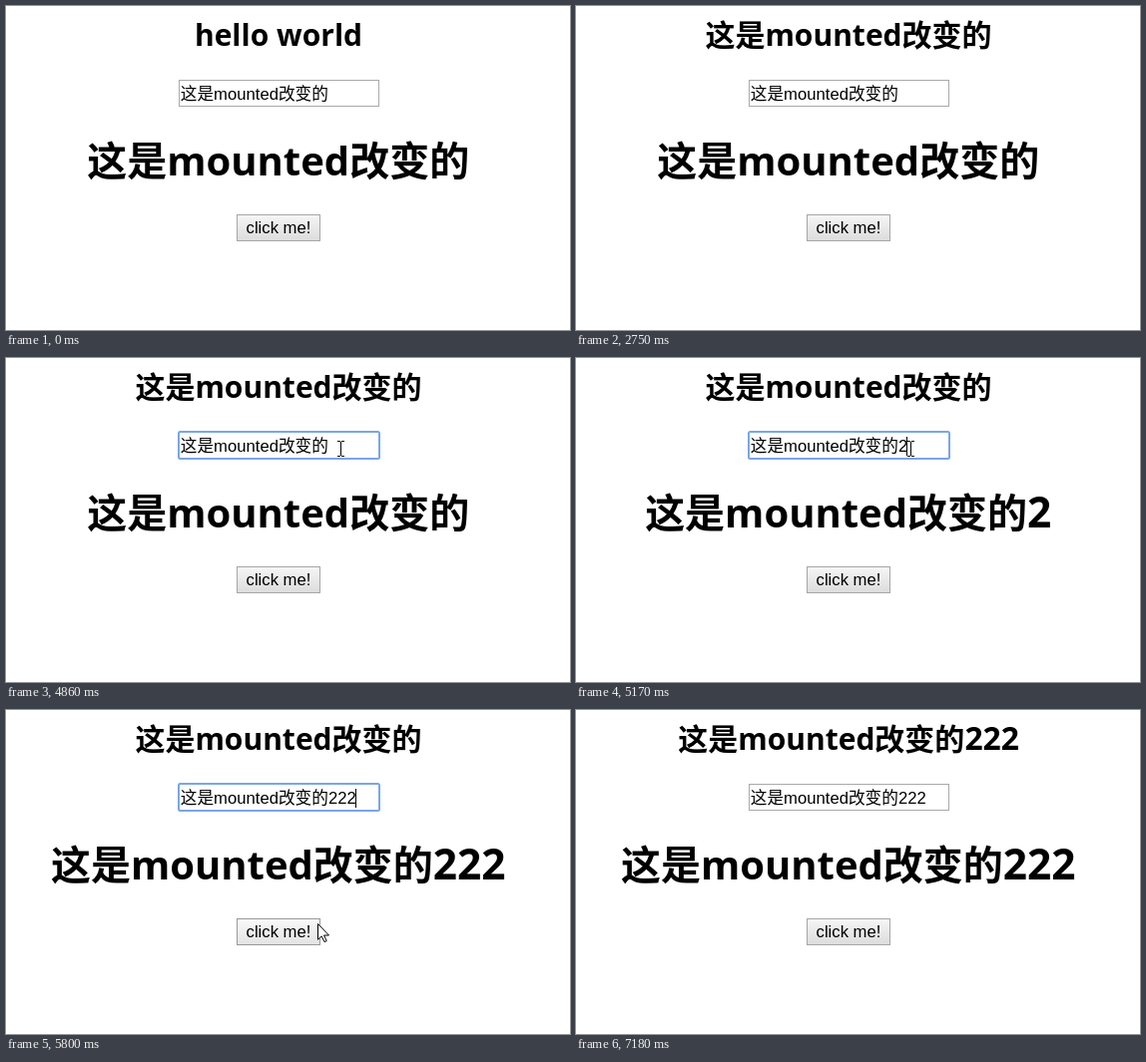
Recreate the animation shown at these times as an HTML page. Size 565 px wide and 325 px high, loop 7810 ms.

```html
<!DOCTYPE html>
<html lang="zh-CN">
<head>
<meta charset="utf-8">
<title>mounted</title>
<style>
  html, body { margin: 0; width: 100%; height: 100%; overflow: hidden; background: #fff; }
  svg { display: block; }
  text { white-space: pre; }
  .head { font-family: "Open Sans", "Noto Sans CJK SC", sans-serif; font-weight: 700; text-anchor: middle; }
  .keys { font-size: 1.06em; }
  .ui { font: 16.667px "Liberation Sans", "Noto Sans CJK SC", sans-serif; }
  .crisp { shape-rendering: crispEdges; }
</style>
</head>
<body>
<svg width="565" height="325" viewBox="0 0 565 325">
  <defs>
    <linearGradient id="face" x2="0" y2="1">
      <stop id="top" offset="0"/><stop id="bottom" offset="1"/>
    </linearGradient>
  </defs>
  <text class="head" x="273" y="40" font-size="30"><tspan id="title"></tspan><tspan id="titleKeys" class="keys"></tspan></text>
  <rect x="173.5" y="74.5" width="200" height="26" fill="#fff" stroke="#a9a9a9"/>
  <rect id="ring" x="173" y="74" width="201" height="27" rx="1.5" fill="none" stroke="#7ba6e6" stroke-width="2"/>
  <text class="ui" id="field" x="174.8" y="94"></text>
  <rect class="crisp" id="caret" y="79" width="1" height="19"/>
  <text class="head" x="272.7" y="170.4" font-size="40">这是mounted改变的<tspan id="bigKeys" class="keys"></tspan></text>
  <rect id="button" x="231.5" y="209.5" width="83" height="26" fill="url(#face)"/>
  <text class="ui" x="240.6" y="228">click me!</text>
  <path id="arrow" d="M.5 .5V16.3L4.2 12.9 7 18.6 9.2 17.6 6.5 12H11.5Z" fill="#fff" stroke="#000"/>
  <path class="crisp" id="beam" d="M-3-8h3v1h-3zM1-8h3v1h-3zM0-7h1v14h-1zM-3 7h3v1h-3zM1 7h3v1h-3z"/>
</svg>
<script>
const LOOP = 7810, BLINK = 530, STEP = 78;
const FOCUS = 4330, FIRST_KEY = 5110, KEY_GAP = 190, PRESS = 6400, RELEASE = 6480;
const BASE = "这是mounted改变的";
const el = id => document.getElementById(id);

// Pointer stops: it enters, focuses the field, clicks the button, leaves
const STOPS = [
  { t: 3220, x: 529, y: 293 },
  { t: 3560, x: 305, y: 228 },
  { t: 3920, x: 312, y: 104 },
  { t: FOCUS, x: 335, y: 91 },
  { t: 5170, x: 335, y: 91 },
  { t: 5400, x: 355, y: 126 },
  { t: 5860, x: 304, y: 230 },
  { t: 6250, x: 277, y: 231 },
  { t: 6800, x: 277, y: 231 },
  { t: 7180, x: 460, y: 330 }
];

function pointer(t) {
  const i = STOPS.findLastIndex(s => s.t <= t);
  if (i < 0) return null;
  const a = STOPS[i], b = STOPS[i + 1];
  if (!b) return a;
  const u = Math.floor((t - a.t) / STEP) * STEP / (b.t - a.t);
  const mix = (p, q) => Math.round(p + (q - p) * u);
  return { x: mix(a.x, b.x), y: mix(a.y, b.y) };
}

function show(id, on) {
  el(id).setAttribute("visibility", on ? "visible" : "hidden");
}

function setText(id, text) {
  if (el(id).textContent !== text) el(id).textContent = text;
}

function draw(t) {
  const count = Math.max(0, Math.min(3, Math.floor((t - FIRST_KEY) / KEY_GAP) + 1));
  const keys = "2".repeat(count);
  setText("title", t < 730 ? "hello world" : t < 2750 ? "你好" : BASE);
  setText("titleKeys", t < RELEASE ? "" : keys);
  setText("field", BASE + keys);
  setText("bigKeys", keys);

  const focused = t >= FOCUS && t < PRESS;
  const since = t - (count ? FIRST_KEY + (count - 1) * KEY_GAP : FOCUS);
  show("ring", focused);
  show("caret", focused && Math.floor(since / BLINK) % 2 === 0);
  el("caret").setAttribute("x", Math.floor(322.6 + 9.27 * count));

  const p = pointer(t);
  const inField = p && p.x > 172 && p.x < 375 && p.y < 106;
  const hover = p && p.x >= 231 && p.x < 315 && p.y >= 209 && p.y <= 236;
  show("beam", inField);
  show("arrow", p && !inField);
  if (p) el(inField ? "beam" : "arrow").setAttribute("transform", `translate(${p.x} ${p.y})`);

  const pressed = t >= PRESS && t < RELEASE;
  const [top, bottom] = pressed ? ["#dedede", "#f6f6f6"] : hover ? ["#f9f9f9", "#e3e3e3"] : ["#f6f6f6", "#dcdcdc"];
  el("top").setAttribute("stop-color", top);
  el("bottom").setAttribute("stop-color", bottom);
  el("button").setAttribute("stroke", hover ? "#999" : "#a6a6a6");
}

const start = performance.now();
function tick() {
  draw((performance.now() - start) % LOOP);
  requestAnimationFrame(tick);
}
tick();
</script>
</body>
</html>
```
